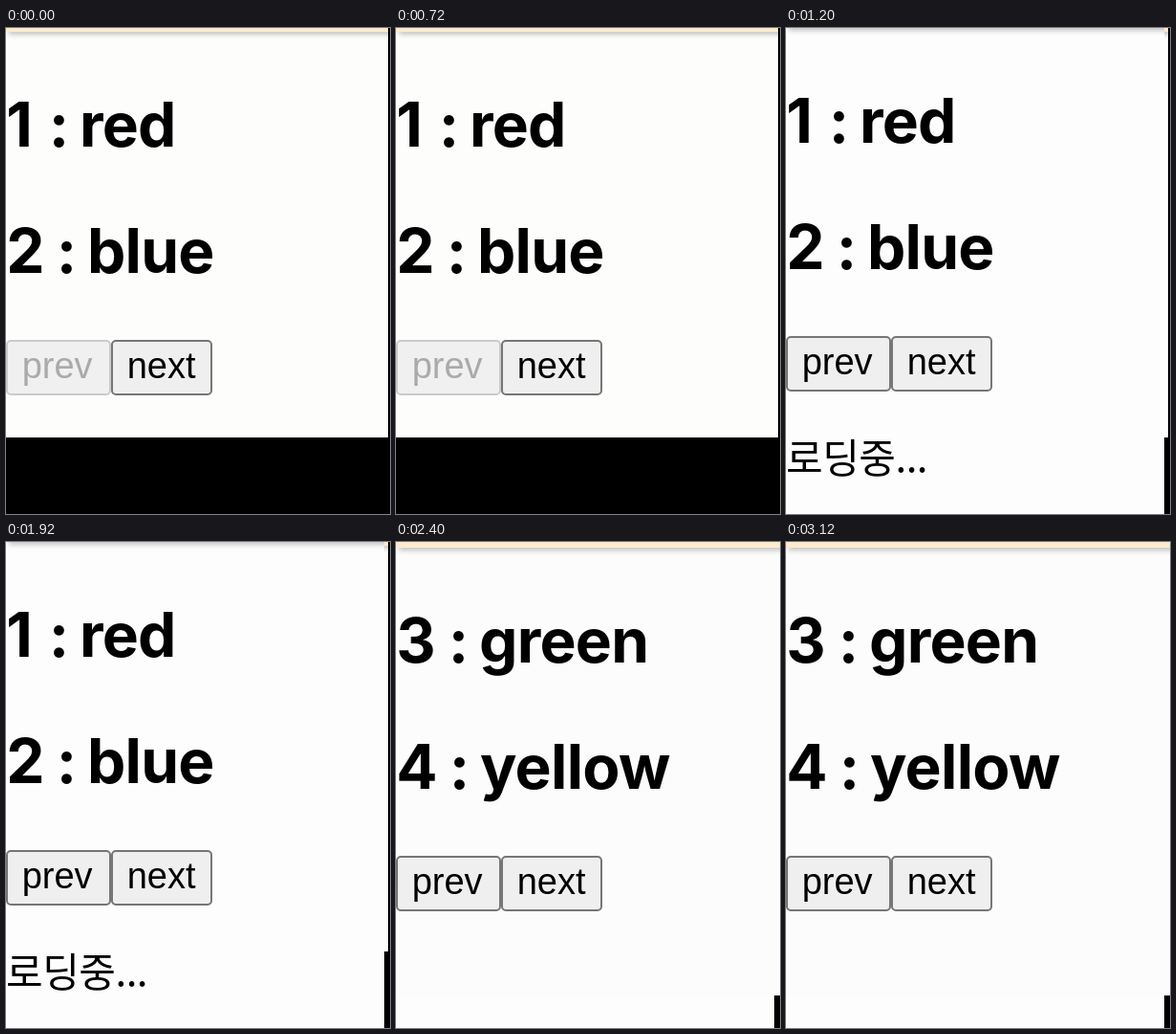
Recreate the animation shown at these times as an HTML page. Size 402 by 508 pixels, loop 3600 ms.

```html
<!DOCTYPE html>
<html lang="ko">
<head>
<meta charset="utf-8">
<style>
  html, body { margin: 0; width: 100%; height: 100%; overflow: hidden; background: #000; }
  #stage { position: relative; width: 402px; height: 508px; overflow: hidden; background: #000; }
  .view { position: absolute; left: 0; top: 0; overflow: hidden; }
  .bar {
    position: absolute; left: 0; top: -60px; width: 420px; height: 64px;
    background: #fdebcf; box-shadow: 3px 3px 5px rgba(0, 0, 0, .22);
  }
  .page { position: absolute; left: 0; top: 0; width: 402px; height: 508px; }
  svg { position: absolute; left: 0; top: 0; overflow: visible; }
  .title { font: 700 64px Inter, sans-serif; font-optical-sizing: none; letter-spacing: -.7px; }
  .colon { text-anchor: middle; }
  .label { font: 38px "Liberation Sans", Arial, sans-serif; }
  .note { font: 42px "Noto Sans CJK KR", "Noto Sans CJK", sans-serif; letter-spacing: -.5px; }
  .button rect { fill: #efefef; stroke: #767676; stroke-width: 2; }
  .off rect { fill: #f0f0f0; stroke: #cbcbcb; }
  .off text { fill: #aaa; }
</style>
</head>
<body>
<div id="stage"></div>
<script>
const LOOP = 3600;

// Each later view covers only the area it repaints.
const views = [
  { start: 0, w: 400, h: 428, shift: 0, bg: '#fdfdfc', off: true,
    rows: [['1', 55, 'red'], ['2', 63, 'blue']] },
  { start: 1200, w: 396, h: 508, shift: -4, bg: '#fdfdfd', note: '로딩중...',
    rows: [['1', 55, 'red'], ['2', 63, 'blue']] },
  { start: 2400, w: 402, h: 474, shift: 2, bg: '#fcfcfc',
    rows: [['3', 65, 'green'], ['4', 66, 'yellow']] }
];

const row = ([id, colonX, name], i) => {
  const y = 124.3 + i * 132;
  return `<g class="title">
    <text x="0.3" y="${y}">${id}</text>
    <text class="colon" x="${colonX}" y="${y}">:</text>
    <text x="${colonX + 21.9}" y="${y}">${name}</text></g>`;
};

const button = (x, w, label, off) => `
  <g class="button ${off ? 'off' : ''}">
    <rect x="${x + 1}" y="327" width="${w - 2}" height="56" rx="4"/>
    <text class="label" x="${x + 16.7}" y="365.7">${label}</text>
  </g>`;

const stage = document.getElementById('stage');

for (const v of views) {
  const el = document.createElement('div');
  el.className = 'view';
  el.style.cssText = `width:${v.w}px;height:${v.h}px;background:${v.bg}`;
  el.innerHTML = `
    <div class="page" style="top:${v.shift}px">
      <div class="bar"></div>
      <svg width="402" height="508">
        ${v.rows.map(row).join('')}
        ${button(0, 110, 'prev', v.off)}
        ${button(110, 106, 'next')}
        ${v.note ? `<text class="note" x="0" y="469.3">${v.note}</text>` : ''}
      </svg>
    </div>`;
  stage.append(el);

  if (v.start) {
    el.animate([
      { opacity: 0, offset: 0, easing: 'step-end' },
      { opacity: 1, offset: v.start / LOOP },
      { opacity: 1, offset: 1 }
    ], { duration: LOOP, iterations: Infinity });
  }
}
</script>
</body>
</html>
```
